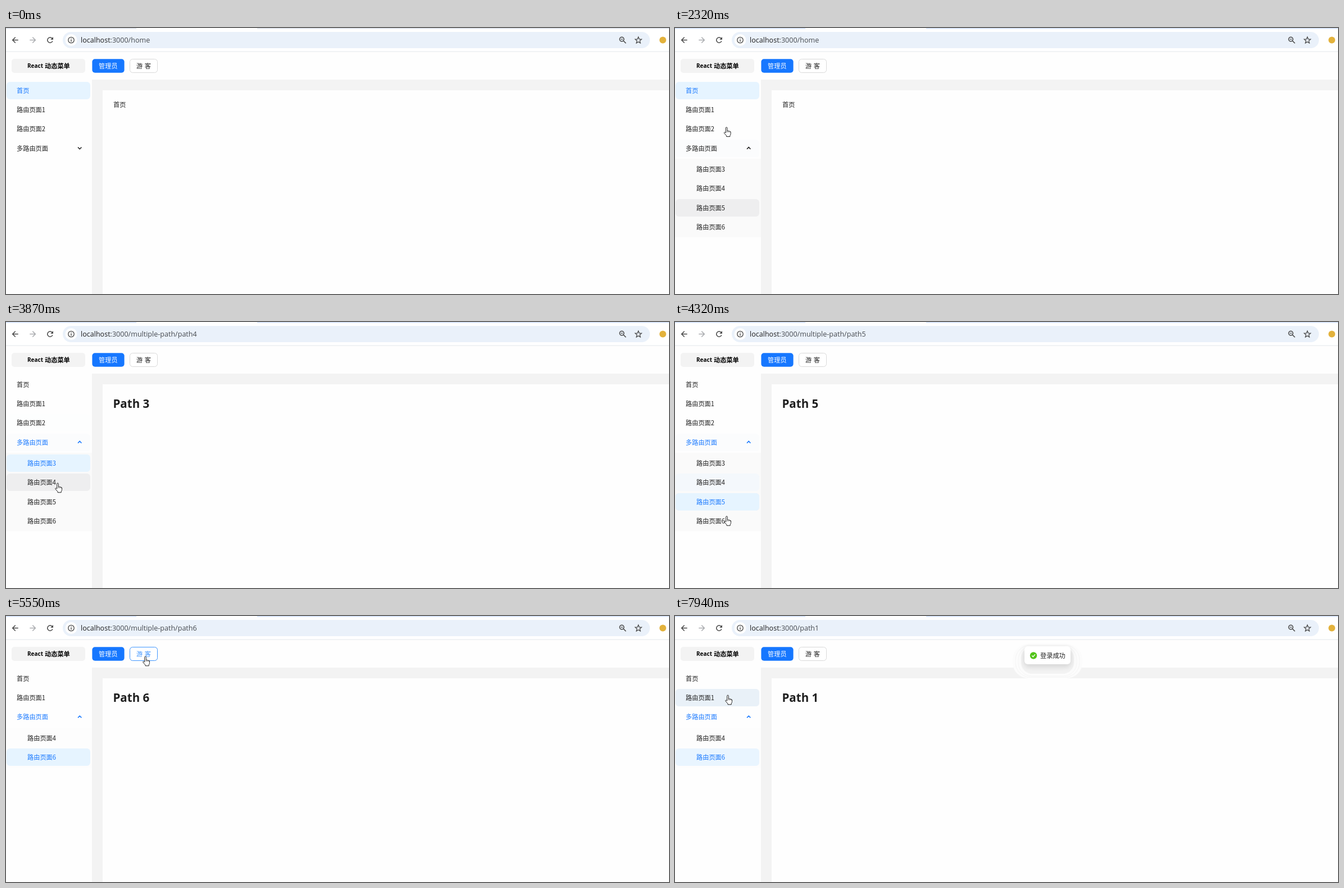
These frames come from a looping animation (1180 by 474 pixels, 7990 ms). An HTML page with a canvas:

```html
<!DOCTYPE html>
<html lang="zh">
<head>
<meta charset="utf-8">
<title>React 动态菜单</title>
<style>
  html, body { margin: 0; width: 100%; height: 100%; overflow: hidden; background: #fefefe; }
  canvas { display: block; width: 1180px; height: 474px; }
</style>
</head>
<body>
<canvas id="stage"></canvas>
<script>
const W = 1180, H = 474, LOOP = 7990;
const canvas = document.getElementById('stage');
const ctx = canvas.getContext('2d');
const dpr = window.devicePixelRatio || 1;
canvas.width = W * dpr;
canvas.height = H * dpr;

const CJK = '"Noto Sans CJK SC", "Noto Sans CJK", sans-serif';
const LATIN = '"Open Sans", "Noto Sans", sans-serif';
const INK = '#1f1f1f', BLUE = '#1677ff', HOVER_BLUE = '#4096ff', PAGE = '#fefefe';
const ROW_H = 31, PITCH = 34.4, FIRST_ROW = 111.5;
const FOCUS_AT = 1640, OPEN_AT = 1790, GUEST_AT = 5500, TOAST_AT = 5550;
const HOVER_LAG = 160, LOAD_TIME = 100, LABEL_LAG = 60;

// Pointer moves: from time, to time, x, y; each starts where the last one ended
const ENTRY = [366, 451];
const MOVES = [
  [230, 850, 100, 148], [1300, 1520, 83, 213], [1860, 2080, 90, 312], [2160, 2530, 92, 147],
  [2750, 2980, 94, 175], [3130, 3360, 92, 256], [3540, 3750, 92, 287], [3980, 4090, 92, 318],
  [4190, 4320, 92, 346], [4440, 4813, 449, 130], [4813, 5140, 248, 72], [5560, 5840, 354, 74],
  [6340, 6720, 183, 72], [7450, 7750, 94, 141]
];
const CLICKS = [2750, 3130, 3540, 3870, 4070, 4370, 7940];

const HAND = new Path2D('M-1.3 9.5V1.4a1.3 1.3 0 0 1 2.6 0V6.6q1.3-1 2.4.4q1.3-.7 2.2.6q1.6-.3 1.6 1.4V11.5q0 2-1.3 3.4V16.8H0V15.2L-3.8 11q-1-1.6.3-2.1q1.2-.2 2.2 1.4z');
const ARROW = new Path2D('M0 0V11.6L2.7 9L4.5 13L6.3 12.2L4.6 8.4H8.3z');

const clamp = v => Math.max(0, Math.min(1, v));
const ramp = (t, from, len) => clamp((t - from) / len);
const smooth = k => k * k * (3 - 2 * k);
const easeOut = k => 1 - (1 - k) ** 3;

// ---- State that follows from the pointer and its clicks ----

function pointer(t) {
  if (t < MOVES[0][0]) return null;
  let [px, py] = ENTRY;
  for (const [from, to, x, y] of MOVES) {
    const k = easeOut(ramp(t, from, to - from));
    px += (x - px) * k;
    py += (y - py) * k;
  }
  return [px, py];
}

function rows(t) {
  const guest = t >= GUEST_AT;
  const list = (guest ? [0, 1] : [0, 1, 2]).map((key, i) => ({
    key, x: 19, mid: FIRST_ROW + i * PITCH, name: key ? '路由页面' + key : '首页'
  }));
  const mid = FIRST_ROW + list.length * PITCH;
  list.push({ key: 'multi', x: 19, mid, name: '多路由页面' });
  if (t >= OPEN_AT) {
    (guest ? [4, 6] : [3, 4, 5, 6]).forEach((key, i) => list.push({
      key, x: 38, mid: mid + 37.2 + i * PITCH, name: '路由页面' + key, sub: true
    }));
  }
  return list;
}

const inRow = (row, [x, y]) => x < 150 && Math.abs(y - row.mid) < PITCH / 2;
const inAdmin = ([x, y]) => x > 153 && x < 211 && y > 55 && y < 80;
const inGuest = ([x, y]) => x > 220 && x < 270 && y > 55 && y < 80;

// Share of the recent past that the pointer spent inside
function hover(t, inside) {
  let n = 0;
  for (let i = 0; i < 5; i++) {
    const spot = pointer(t - HOVER_LAG - 20 * i);
    if (spot && inside(spot)) n++;
  }
  return n / 5;
}

const picks = [{ click: -LOOP, load: -LOOP, page: 0 }].concat(CLICKS.map(click => {
  const page = rows(click).find(row => inRow(row, pointer(click))).key;
  return { click, page, load: click + (page > 2 ? LOAD_TIME : 0) };
}));
const pickIndex = (t, stage) => picks.filter(p => p[stage] <= t).length - 1;
const pageAt = (t, stage) => picks[pickIndex(t, stage)].page;

// ---- Drawing helpers ----

function box(x, y, w, h, r, fill, stroke) {
  ctx.beginPath();
  ctx.roundRect(x, y, w, h, r);
  if (fill) { ctx.fillStyle = fill; ctx.fill(); }
  if (stroke) { ctx.strokeStyle = stroke; ctx.lineWidth = 1; ctx.stroke(); }
}

function rect(x, y, w, h, fill) {
  ctx.fillStyle = fill;
  ctx.fillRect(x, y, w, h);
}

function disc(x, y, r, fill) {
  ctx.beginPath();
  ctx.arc(x, y, r, 0, 7);
  ctx.fillStyle = fill;
  ctx.fill();
}

function ring(x, y, r, color, width, from = 0, to = Math.PI * 2) {
  ctx.beginPath();
  ctx.arc(x, y, r, from, to);
  ctx.strokeStyle = color;
  ctx.lineWidth = width;
  ctx.stroke();
}

function line(color, width, ...points) {
  ctx.beginPath();
  for (let i = 0; i < points.length; i += 2) ctx.lineTo(points[i], points[i + 1]);
  ctx.strokeStyle = color;
  ctx.lineWidth = width;
  ctx.stroke();
}

function text(str, x, base, font, color) {
  ctx.font = font;
  ctx.fillStyle = color;
  ctx.fillText(str, x, base);
  return x + ctx.measureText(str).width;
}

const label = (str, x, mid, color = INK) => text(str, x, mid + 4, '11.2px ' + CJK, color);

function fade(alpha, draw) {
  if (alpha <= 0) return;
  ctx.save();
  ctx.globalAlpha *= alpha;
  draw();
  ctx.restore();
}

// ---- Parts of the picture ----

function arrowIcon(x, dir, color) {
  line(color, 1.5, x - 5 * dir, 21.5, x + 5 * dir, 21.5);
  line(color, 1.5, x, 16.5, x + 5 * dir, 21.5, x, 26.5);
}

function toolbar(t) {
  const dark = '#474747';
  const strip = t < FOCUS_AT ? '#dde3ed' : '#d3e3fd';
  rect(0, 0, W, 42, '#fff');
  rect(0, 0, 232, 1.5, strip);
  rect(447, 0, W - 447, 1.5, strip);
  rect(0, 41.5, W, 1, '#e4e7ec');

  arrowIcon(16.7, -1, dark);
  arrowIcon(47.3, 1, '#a9abae');
  ring(78.5, 21.5, 4.7, dark, 1.5, 0.4, 5.6);
  ctx.fillStyle = dark;
  ctx.beginPath();
  ctx.moveTo(84, 16);
  ctx.lineTo(84, 20.8);
  ctx.lineTo(79.2, 20.8);
  ctx.fill();

  box(101, 7, 1045, 29, 14.5, '#eaf1fa');
  disc(116, 21.5, 10.5, '#fff');
  ring(116, 21.5, 5.2, dark, 1.3);
  line(dark, 1.4, 116, 20.8, 116, 24.4);
  line(dark, 1.4, 116, 18.4, 116, 19.8);

  const page = pageAt(t, 'click');
  const path = page ? (page > 2 ? '/multiple-path' : '') + '/path' + page : '/home';
  const font = '12.55px ' + LATIN;
  const x = text('localhost', 133, 26, font, INK);
  text(':3000' + path, x, 26, font, '#474b50');

  ring(1096, 20, 3.8, dark, 1.5);
  line(dark, 1.6, 1098.8, 22.8, 1103.3, 27.3);
  line(dark, 1.2, 1094, 20, 1098, 20);
  ctx.beginPath();
  for (let i = 0; i < 10; i++) {
    const a = i * Math.PI / 5 - Math.PI / 2, r = i % 2 ? 2.7 : 6;
    ctx.lineTo(1125.5 + r * Math.cos(a), 22 + r * Math.sin(a));
  }
  ctx.closePath();
  ctx.strokeStyle = dark;
  ctx.lineWidth = 1.3;
  ctx.stroke();
  disc(1169, 21.5, 6, '#e3b23c');
}

function header(t) {
  box(10, 55, 131, 25, 5, '#f3f3f3');
  text('React', 38, 71.4, '700 10px ' + LATIN, '#000');
  text('动态菜单', 69, 71.5, '700 11.2px ' + CJK, '#000');

  const admin = color => box(153.4, 55.2, 57.2, 24.5, 5, color);
  admin(BLUE);
  fade(hover(t, inAdmin), () => admin(HOVER_BLUE));
  label('管理员', 165, 67.5, '#fff');

  const guest = (ink, edge) => {
    box(220.5, 55.5, 49, 24, 5, '#fff', edge);
    label('游', 232, 67.5, ink);
    label('客', 246.8, 67.5, ink);
  };
  guest(INK, '#d9d9d9');
  fade(hover(t, inGuest), () => guest(HOVER_BLUE, HOVER_BLUE));
}

function drawRow(row, t) {
  const i = pickIndex(t, 'load');
  const now = picks[i], past = picks[i - 1];
  const chosen = now.page === row.key ? 0.6 + 0.4 * ramp(t, now.load, 120)
    : past && past.page === row.key ? 0.85 * (1 - ramp(t, now.load, 250)) : 0;
  const fill = color => box(1, Math.round(row.mid - 16), 149, ROW_H, 6, color);
  fade(hover(t, spot => inRow(row, spot)), () => fill('#eeeeef'));
  fade(chosen, () => fill('#e6f4ff'));

  const lit = pageAt(t - LABEL_LAG, 'load');
  const blue = lit === row.key || (row.key === 'multi' && lit > 2);
  const color = blue ? BLUE : INK;
  label(row.name, row.x, row.mid, color);
  if (row.key === 'multi') {
    const bend = 1.6 * (1 - 2 * smooth(ramp(t, OPEN_AT, 250)));
    const y = row.mid - 0.6;
    line(color, 1.6, 128, y - bend, 131.2, y + bend, 134.4, y - bend);
  }
}

function menu(t) {
  const guest = t >= GUEST_AT;
  const list = rows(t);
  const subs = list.filter(row => row.sub);
  const { mid } = list.find(row => row.key === 'multi');
  const open = smooth(ramp(t, OPEN_AT, 250));
  if (!guest) fade(open, () => box(1, mid - 15.5, 149, ROW_H, 6, '#fbfcfd'));
  list.filter(row => !row.sub).forEach(row => drawRow(row, t));

  const top = mid + 18.3;
  const height = (subs.length * PITCH + 2.4) * open;
  fade(open, () => {
    ctx.beginPath();
    ctx.rect(0, top, 153, height);
    ctx.clip();
    rect(0, top, 153, height, guest ? '#fdfdfd' : '#fafafa');
    subs.forEach(row => drawRow(row, t));
  });
}

function content(t) {
  rect(153, 92, W - 153, H - 92, '#f3f3f3');
  rect(172, 111, W - 172, H - 111, PAGE);
  const page = pageAt(t, 'load');
  if (page) text('Path ' + page, 190.5, 153, '700 20.5px ' + LATIN, INK);
  else label('首页', 191, 137);
}

function toast(t) {
  const k = smooth(ramp(t, TOAST_AT, 260));
  fade(k, () => {
    ctx.translate(0, -40 * (1 - k));
    for (let i = 0; i < 3; i++) {
      box(601 + 5 * i, 50 + 2 * i, 124 - 10 * i, 61 - 4 * i, 28 - 2 * i, i ? null : '#fcfcfc', i ? '#f5f5f5' : null);
    }
    box(616, 55, 94, 48, 20, '#f3f3f3');
    ctx.shadowColor = 'rgba(0,0,0,.14)';
    ctx.shadowBlur = 11 * dpr;
    ctx.shadowOffsetY = 4 * dpr;
    box(622, 54, 82, 32, 6, '#fff');
    ctx.shadowColor = 'transparent';
    disc(638, 70.5, 6.2, '#52c41a');
    line('#fff', 1.4, 635.2, 70.6, 637.3, 72.8, 641, 68.4);
    label('登录成功', 650, 70.5);
  });
}

function drawPointer(t) {
  const spot = pointer(t);
  if (!spot) return;
  const hand = inAdmin(spot) || inGuest(spot) || rows(t).some(row => inRow(row, spot));
  const shape = hand ? HAND : ARROW;
  ctx.save();
  ctx.translate(...spot);
  ctx.fillStyle = '#fff';
  ctx.strokeStyle = '#222';
  ctx.lineWidth = 1;
  ctx.lineJoin = 'round';
  ctx.fill(shape);
  ctx.stroke(shape);
  if (hand) {
    for (let i = 0; i < 3; i++) line('#222', 0.8, 1.3 + 2.4 * i, 6.6 + 0.5 * i, 1.3 + 2.4 * i, 9.2);
  }
  ctx.restore();
}

function draw(t) {
  ctx.setTransform(dpr, 0, 0, dpr, 0, 0);
  rect(0, 0, W, H, PAGE);
  content(t);
  header(t);
  menu(t);
  toast(t);
  toolbar(t);
  drawPointer(t);
}

const start = performance.now();
function tick() {
  draw((performance.now() - start) % LOOP);
  requestAnimationFrame(tick);
}
tick();
</script>
</body>
</html>
```
